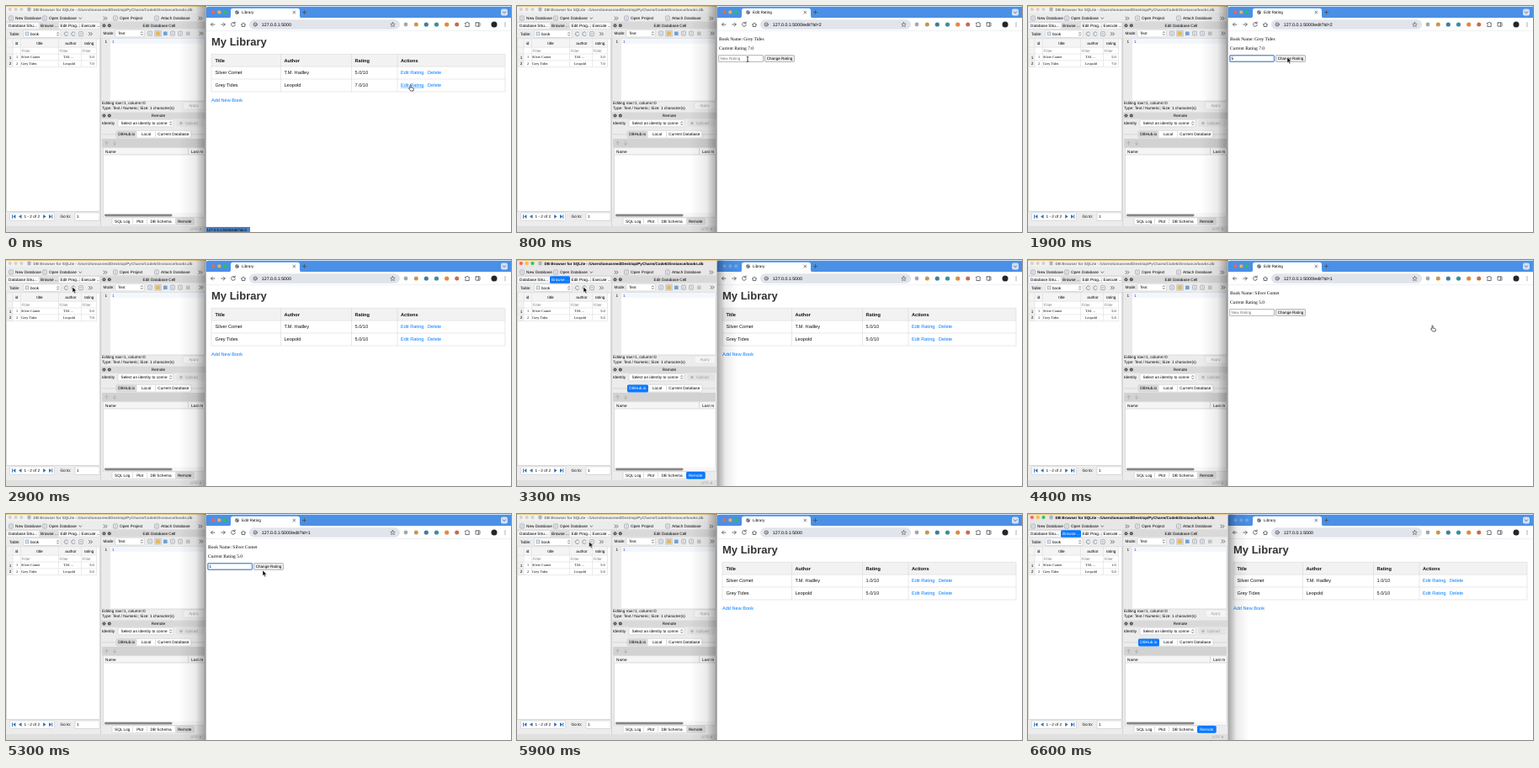
Write an HTML page that moves like this. It is 600 px wide and 269 px high and loops after 6.7 s.

```html
<!DOCTYPE html>
<html lang="en">
<head>
<meta charset="utf-8">
<title>Library ratings</title>
<style>
html, body { margin: 0; width: 100%; height: 100%; overflow: hidden; background: #fff; }
svg { display: block; width: 600px; height: 269px; }
text { font: 4.7px "Liberation Sans", Arial, sans-serif; fill: #000; text-rendering: geometricPrecision; }
.mid { text-anchor: middle; }
.end { text-anchor: end; }
.dim text, text.dim { fill: #a0a0a0; }
.small text { font-size: 4.3px; }
.filter text { fill: #858585; }
.cells text { font: 4.2px "Liberation Serif", Times, serif; }
.title text { font-size: 4.5px; font-weight: bold; text-anchor: middle; }
.title .back { fill: #777; }
.url text { font-size: 5.25px; }
.page text { font-size: 5.6px; fill: #111; }
.page .head text { font-weight: bold; }
.page .h1 { font-size: 13px; font-weight: bold; fill: #333; }
.page .link { fill: #007bff; }
.form text { font: 5.5px "Liberation Serif", Times, serif; fill: #000; }
.form .ctl { font: 4.6px "Liberation Sans", Arial, sans-serif; }
.form .hint { fill: #757575; }
.line { fill: none; stroke: #c6c6c6; stroke-width: .6; }
.box { fill: #fff; stroke: #c9c9c9; stroke-width: .6; }
.ink { fill: none; stroke: #4b4f55; stroke-width: .8; stroke-linecap: round; stroke-linejoin: round; }
.pill { fill: #0a7aff; }
.pill ~ text { fill: #fff; }

/* state changes are hard cuts, only the pointer travels */
.lib, .edit, .front, .back, .hover1, .hover2, .focus, .hint, .typed, .first, .second,
.old-a, .new-a, .old-b, .new-b, .db-old-a, .db-new-a, .db-old-b, .db-new-b,
.arrow, .hand, .beam { animation: 6.7s step-end infinite; }
.lib { animation-name: lib; }
.edit { animation-name: edit; }
.front { animation-name: front; }
.back { animation-name: back; }
.hover1 { animation-name: hover1; }
.hover2 { animation-name: hover2; }
.focus { animation-name: focus; }
.hint { animation-name: hint; }
.typed { animation-name: typed; }
.second { animation-name: until3000; }
.first { animation-name: from3000; }
.old-a { animation-name: until5500; }
.new-a { animation-name: from5500; }
.old-b { animation-name: until2000; }
.new-b { animation-name: from2000; }
.db-old-a { animation-name: until6200; }
.db-new-a { animation-name: from6200; }
.db-old-b { animation-name: until3300; }
.db-new-b { animation-name: from3300; }
.arrow { animation-name: arrow; }
.hand { animation-name: hand; }
.beam { animation-name: beam; }
.pointer { animation: travel 6.7s ease-in-out infinite; }

@keyframes lib { 0% { opacity: 1 } 4.47% { opacity: 0 } 29.85% { opacity: 1 } 65.67% { opacity: 0 } 82.08%, to { opacity: 1 } }
@keyframes edit { 0% { opacity: 0 } 4.47% { opacity: 1 } 29.85% { opacity: 0 } 65.67% { opacity: 1 } 82.08%, to { opacity: 0 } }
@keyframes front { 0% { opacity: 0 } 44.77% { opacity: 1 } 61.19% { opacity: 0 } 89.55%, to { opacity: 1 } }
@keyframes back { 0% { opacity: 1 } 44.77% { opacity: 0 } 61.19% { opacity: 1 } 89.55%, to { opacity: 0 } }
@keyframes hover2 { 0% { opacity: 1 } 4.47%, to { opacity: 0 } }
@keyframes hover1 { 0% { opacity: 0 } 61.19% { opacity: 1 } 65.67%, to { opacity: 0 } }
@keyframes focus { 0% { opacity: 0 } 13.43% { opacity: 1 } 29.85% { opacity: 0 } 74.62%, to { opacity: 1 } }
@keyframes hint { 0% { opacity: 1 } 17.91% { opacity: 0 } 29.85% { opacity: 1 } 76.11%, to { opacity: 0 } }
@keyframes typed { 0% { opacity: 0 } 17.91% { opacity: 1 } 29.85% { opacity: 0 } 76.11%, to { opacity: 1 } }
@keyframes until2000 { 0% { opacity: 1 } 29.85%, to { opacity: 0 } }
@keyframes from2000 { 0% { opacity: 0 } 29.85%, to { opacity: 1 } }
@keyframes until3000 { 0% { opacity: 1 } 44.77%, to { opacity: 0 } }
@keyframes from3000 { 0% { opacity: 0 } 44.77%, to { opacity: 1 } }
@keyframes until3300 { 0% { opacity: 1 } 49.25%, to { opacity: 0 } }
@keyframes from3300 { 0% { opacity: 0 } 49.25%, to { opacity: 1 } }
@keyframes until5500 { 0% { opacity: 1 } 82.08%, to { opacity: 0 } }
@keyframes from5500 { 0% { opacity: 0 } 82.08%, to { opacity: 1 } }
@keyframes until6200 { 0% { opacity: 1 } 92.53%, to { opacity: 0 } }
@keyframes from6200 { 0% { opacity: 0 } 92.53%, to { opacity: 1 } }
@keyframes hand { 0% { opacity: 1 } 5.97% { opacity: 0 } 61.19% { opacity: 1 } 66.41%, to { opacity: 0 } }
@keyframes beam { 0% { opacity: 0 } 10.44% { opacity: 1 } 21% { opacity: 0 } 71.64% { opacity: 1 } 76.86%, to { opacity: 0 } }
@keyframes arrow {
  0% { opacity: 0 } 5.97% { opacity: 1 } 10.44% { opacity: 0 } 21% { opacity: 1 } 61.19% { opacity: 0 }
  66.41% { opacity: 1 } 71.64% { opacity: 0 } 76.86% { opacity: 1 } 94.02%, to { opacity: 0 }
}
@keyframes travel {
  0%, 4.47% { transform: translate(480px, 94px) }
  11.9%, 19.4% { transform: translate(274px, 63px) }
  26.8%, 29.85% { transform: translate(308px, 61px) }
  41.8%, 50.7% { transform: translate(79px, 32px) }
  59%, 65.67% { transform: translate(480px, 78px) }
  73.1%, 76.1% { transform: translate(276px, 63px) }
  79.1% { transform: translate(305px, 67px) }
  80.6%, 82.8% { transform: translate(307px, 63px) }
  88.8%, to { transform: translate(79px, 32px) }
}
</style>
</head>
<body>
<svg viewBox="0 0 600 269">
  <defs>
    <linearGradient id="shade"><stop offset="0" stop-opacity="0"/><stop offset=".6" stop-opacity=".08"/><stop offset="1" stop-opacity=".35"/></linearGradient>
    <path id="updown" d="M1.4 2.8l1.1-1.2 1.1 1.2M1.4 4.3l1.1 1.2 1.1-1.2" fill="none" stroke-width=".7"/>
    <g id="step">
      <use class="back" href="#updown" stroke="#222"/>
      <g class="front"><rect width="5" height="7" rx="1.3" fill="#1f7bf5"/><use href="#updown" stroke="#fff"/></g>
    </g>
    <path id="more" class="ink" d="M0 0l1.6 1.7L0 3.4M2.4 0L4 1.7 2.4 3.4"/>
    <g id="dock">
      <circle r="2" fill="#4b4b4b"/><circle cx="6.3" r="2" fill="#4b4b4b"/>
      <path d="M-.8-.8l1.6 1.6M.8-.8l-1.6 1.6M5.5 0h1.6" stroke="#eee" stroke-width=".5"/>
    </g>
    <g id="lights"><circle r="2"/><circle cx="6.8" r="2"/><circle cx="13.6" r="2"/></g>
    <g id="lit">
      <circle r="2" fill="#ff5f57"/><circle cx="6.8" r="2" fill="#febc2e"/><circle cx="13.6" r="2" fill="#28c840"/>
    </g>
    <g id="doc"><rect x="-2.3" y="-2.5" width="4.6" height="5" rx=".6" fill="#f7f9fb" stroke="#7b8794" stroke-width=".6"/><path d="M-1.2-.7h2.4M-1.2.8h2.4" stroke="#7b8794" stroke-width=".5"/></g>
  </defs>

  <!-- database window -->
  <rect width="238" height="269" fill="#ececec"/>
  <rect width="238" height="8" fill="#f1f1f1"/>
  <rect class="front" width="238" height="19" fill="#e8e6e6"/>
  <rect width="238" height=".8" fill="#e6c272"/>
  <use href="#lights" x="4.8" y="4" fill="#d2d0cc"/>
  <use class="front" href="#lit" x="4.8" y="4"/>
  <g class="title">
    <rect x="25.5" y="1.8" width="4" height="4.4" rx=".8" fill="#a9b4bf"/>
    <text class="back" x="127" y="5.7">DB Browser for SQLite - /Users/tomasreed/Desktop/PyCharm/Code63/instance/books.db</text>
    <text class="front" x="127" y="5.7">DB Browser for SQLite - /Users/tomasreed/Desktop/PyCharm/Code63/instance/books.db</text>
  </g>
  <use href="#doc" x="6" y="14.5"/><text x="11" y="16.4">New Database</text>
  <use href="#doc" x="46" y="14.5"/><text x="51" y="16.4">Open Database</text>
  <path d="M87 14l1.3 1.4 1.3-1.4" class="ink"/>
  <use href="#more" x="116" y="13"/>
  <use href="#doc" x="130" y="14.5"/><text x="135" y="16.4">Open Project</text>
  <use href="#doc" x="179" y="14.5"/><text x="184" y="16.4">Attach Database</text>
  <use href="#more" x="229" y="13"/>
  <path class="line" d="M0 19H238M112.5 19V262"/>

  <!-- browse pane -->
  <rect x=".5" y="19.5" width="111" height="8" rx="1.5" fill="#f8f8f8" stroke="#d2d2d2" stroke-width=".5"/>
  <rect x="39" y="19.5" width="24" height="8" rx="1.5" fill="#dedede"/>
  <path class="line" d="M87.5 20.5v6"/>
  <text x="3" y="25.2">Database Stru...</text>
  <text x="41" y="25.2">Browse ...</text>
  <text x="64.5" y="25.2">Edit Prag...</text>
  <text x="89.5" y="25.2">Execute ...</text>
  <g class="front"><rect class="pill" x="39" y="19.3" width="24" height="8.4" rx="1.5"/><text x="41" y="25.2">Browse ...</text></g>
  <text x="4" y="35">Table:</text>
  <rect class="box" x="20.5" y="28.8" width="44.5" height="8.7" rx="1.6"/>
  <rect x="23" y="31" width="4" height="4" fill="#d7e4f3" stroke="#7b8794" stroke-width=".5"/>
  <text x="29" y="35">book</text>
  <use href="#step" x="59.2" y="29.7"/>
  <path class="ink" d="M73.6 32a2.3 2.3 0 1 0 0 2.4M82 32a2.3 2.3 0 1 0 0 2.4" style="stroke:#7c8a99"/>
  <use href="#doc" x="89" y="33.2"/>
  <use href="#more" x="98.5" y="31.5"/>
  <rect class="box" x=".5" y="39" width="111" height="205.5"/>
  <path d="M1 39.4h106.5V57H1z" fill="#f4f4f4"/>
  <path d="M8 49.2h99.5V57H8z" fill="#fff"/>
  <path d="M1 57h7v15.6H1z" fill="#f0f0f0"/>
  <path class="line" d="M8 39V72.6M17.5 39V72.6M62.5 39V72.6M89.5 39V72.6M107.5 39V72.6M1 49.2H107.5M1 57H107.5M1 64.8H107.5M1 72.6H107.5" style="stroke:#dedede"/>
  <g class="mid">
    <text x="12.5" y="45.8">id</text><text x="40" y="45.8">title</text>
    <text x="77" y="45.8">author</text><text x="98.5" y="45.8">rating</text>
    <text x="5" y="62.5">1</text><text x="5" y="70.2">2</text>
  </g>
  <g class="filter">
    <text x="18.5" y="54.9">Filter</text><text x="63.5" y="54.9">Filter</text><text x="90.5" y="54.9">Filter</text>
  </g>
  <g class="cells">
    <text x="12" y="62.2">1</text><text x="18" y="62.2">Silver Comet</text><text x="68" y="62.2">T.M. ...</text>
    <text x="12" y="70">2</text><text x="18" y="70">Grey Tides</text><text x="68" y="70">Leopold</text>
    <g class="end">
      <text class="db-old-a" x="104.5" y="62.2">5.0</text><text class="db-new-a" x="104.5" y="62.2">1.0</text>
      <text class="db-old-b" x="104.5" y="70">7.0</text><text class="db-new-b" x="104.5" y="70">5.0</text>
    </g>
  </g>
  <rect class="box" x="4.5" y="246" width="53" height="9.3" rx="1"/>
  <path d="M7 248.3h.9v4.6H7zM11.4 248.3v4.6l-3.2-2.3zM18.5 248.3v4.6l-3.4-2.3zM44.2 248.3v4.6l3.4-2.3zM51 248.3v4.6l3.2-2.3zM54.4 248.3h.9v4.6h-.9z" fill="#2f6fb5"/>
  <text x="21.5" y="252.4">1 - 2 of 2</text>
  <text x="64.5" y="252.4">Go to:</text>
  <rect class="box" x="82" y="246" width="29" height="9.3"/>
  <text x="84" y="252.4">1</text>

  <!-- cell editor -->
  <rect x="113" y="19.3" width="124" height="8" fill="#d9d9d9"/>
  <use href="#dock" x="116.5" y="23.3"/>
  <text class="mid" x="182" y="25.1">Edit Database Cell</text>
  <text x="115.5" y="34.3">Mode:</text>
  <rect class="box" x="130" y="28.2" width="34.5" height="8.7" rx="1.6"/>
  <text x="133" y="34.3">Text</text>
  <use href="#step" x="158.8" y="29"/>
  <use href="#doc" x="171" y="32.6"/>
  <rect x="176" y="28.5" width="9" height="8.2" rx="1" fill="#d2d2d2"/>
  <rect x="178.2" y="30.4" width="4.6" height="4.6" rx=".5" fill="#e7b85a"/>
  <rect x="187" y="30.4" width="4.6" height="4.6" rx=".5" fill="#6fa1d8"/>
  <use href="#doc" x="198" y="32.6"/><use href="#doc" x="207" y="32.6"/>
  <rect x="214" y="30.4" width="4.6" height="4.6" rx=".5" fill="#c4c4c4"/>
  <use href="#more" x="230" y="30.9"/>
  <rect class="box" x="114" y="38.3" width="122" height="74.7"/>
  <rect x="114.4" y="38.6" width="9.6" height="74.1" fill="#eaeaea"/>
  <rect x="124" y="38.8" width="111.7" height="6" fill="#f3f7fd"/>
  <text x="117.5" y="43.6">1</text><text x="126" y="43.6" style="fill:#2d4fc9">1</text>
  <text x="114" y="117.2">Editing row=1, column=0</text>
  <text x="114" y="123">Type: Text / Numeric; Size: 1 character(s)</text>
  <rect x="211" y="114.3" width="24.5" height="8.8" rx="1.7" fill="#f5f5f5" stroke="#dcdcdc" stroke-width=".5"/>
  <text class="mid dim" x="223" y="120.4">Apply</text>

  <!-- remote pane -->
  <rect x="113" y="126.6" width="124" height="8" fill="#d9d9d9"/>
  <use href="#dock" x="116.5" y="130.6"/>
  <text class="mid" x="181" y="132.3">Remote</text>
  <text x="114" y="141">Identity</text>
  <rect class="box" x="133" y="135.2" width="66" height="8.6" rx="1.6"/>
  <text x="136.5" y="141">Select an identity to conne</text>
  <use href="#step" x="193.2" y="136"/>
  <rect x="202.5" y="135.2" width="33" height="8.6" rx="1.6" fill="#e3e3e3"/>
  <circle cx="208" cy="139.5" r="1.8" fill="#b9b9b9"/>
  <text class="dim" x="213" y="141">Upload</text>
  <path class="line" d="M114 152.8H236"/>
  <rect class="box" x="131" y="148.3" width="89" height="8.8" rx="1.7"/>
  <rect x="131" y="148.3" width="24.5" height="8.8" rx="1.7" fill="#d9d9d9"/>
  <path class="line" d="M177.5 149.5v6.4"/>
  <g class="mid">
    <text x="143.2" y="154.4">DBHub.io</text><text x="166.5" y="154.4">Local</text><text x="198.8" y="154.4">Current Database</text>
    <g class="front"><rect class="pill" x="131" y="148.4" width="25" height="9" rx="1.7"/><text x="143.4" y="154.4">DBHub.io</text></g>
  </g>
  <rect x="114" y="158" width="122" height="10.3" fill="#d2d2d2"/>
  <path class="ink" d="M118 163l1.6-1.7 1.6 1.7M119.6 161.3v4M127.4 163.6l1.6 1.7 1.6-1.7M129 161.3v4" style="stroke:#aaa"/>
  <rect class="box" x="115.5" y="169" width="120.5" height="82.5"/>
  <rect x="115.8" y="169.3" width="120" height="7.6" fill="#f5f5f5"/>
  <path class="line" d="M116 177H236M216.5 169v8"/>
  <text x="118" y="174.6">Name</text><text x="220" y="174.6">Last m</text>
  <path d="M116 246.5h119.8v4.8H116z" fill="#f7f7f7"/>
  <rect x="117" y="247.8" width="80.5" height="2.6" rx="1.3" fill="#858585"/>
  <rect class="box" x="126" y="252" width="97.5" height="8.6" rx="1.7"/>
  <rect x="201" y="252" width="22.5" height="8.6" rx="1.7" fill="#d9d9d9"/>
  <path class="line" d="M150.5 253.3v6M167.5 253.3v6"/>
  <g class="mid">
    <text x="138.2" y="258">SQL Log</text><text x="159.2" y="258">Plot</text>
    <text x="184" y="258">DB Schema</text><text x="212.2" y="258">Remote</text>
    <g class="front"><rect class="pill" x="201" y="251.9" width="22.7" height="8.8" rx="1.7"/><text x="212.2" y="258">Remote</text></g>
  </g>
  <path d="M0 262h238v7H0z" fill="#e0e0e0"/>
  <text class="dim" x="219" y="267">UTF-8</text>
  <rect class="back" x="206" width="32" height="269" fill="url(#shade)"/>

  <!-- browser window -->
  <path d="M237.5 269V4q0-3.3 3.3-3.3H600V269z" fill="#fff"/>
  <path d="M237.5 14V4q0-3.3 3.3-3.3H600V14z" fill="#4a90e6"/>
  <use class="back" href="#lit" x="246.5" y="7.3"/>
  <use class="front" href="#lights" x="246.5" y="7.3" fill="#79abea"/>
  <path d="M264.5 14.2q2.5 0 2.5-2.5V5.4q0-2.6 2.6-2.6h76.8q2.6 0 2.6 2.6v6.3q0 2.5 2.5 2.5z" fill="#fff"/>
  <circle cx="274.5" cy="7.6" r="2.4" fill="#5f6368"/>
  <path d="M272.6 7.2q2 .4 1.6 2.2M274.6 5.4q0 1.6 2 1.6" fill="none" stroke="#fff" stroke-width=".6"/>
  <text class="lib" x="280" y="9.2">Library</text><text class="edit" x="280" y="9.2">Edit Rating</text>
  <rect x="588" y="3.6" width="8" height="8" rx="2" fill="#cfe0fa"/>
  <path class="ink" d="M341 6.2l2.6 2.6M343.6 6.2l-2.6 2.6M354.5 5.4v4.2M352.4 7.5h4.2M590.4 6.9l1.6 1.6 1.6-1.6"/>
  <path class="line" d="M238 29.6H600" style="stroke:#e1e4e9"/>
  <path class="ink" d="M248 22h-4.4m1.9-2l-2 2 2 2M255.8 22h4.4m-1.9-2l2 2-2 2M271.8 20.4a2.4 2.4 0 1 0 .5 2M272.1 18.9v1.8h-1.8M279.4 22.2l2.6-2.3 2.6 2.3M280.2 21.8v2.7h3.6v-2.7"/>
  <rect x="289" y="16.3" width="179" height="11.4" rx="5.7" fill="#e1e4ea"/>
  <circle class="ink" cx="296.2" cy="22" r="2.1"/><path class="ink" d="M296.2 21.8v1"/>
  <g class="url">
    <text class="lib" x="303.8" y="23.9">127.0.0.1:5000</text>
    <g class="edit">
      <text class="second" x="303.8" y="23.9">127.0.0.1:5000/edit?id=2</text>
      <text class="first" x="303.8" y="23.9">127.0.0.1:5000/edit?id=1</text>
    </g>
  </g>
  <path class="ink" d="M459.5 19.4l.8 1.8 1.9.2-1.4 1.3.4 1.9-1.7-1-1.7 1 .4-1.9-1.4-1.3 1.9-.2z" style="stroke-width:.6"/>
  <circle cx="475" cy="22" r="2.4" fill="#a3a8ae"/>
  <circle cx="487.3" cy="22" r="2.5" fill="#c9964f"/>
  <circle cx="499.3" cy="22" r="2.6" fill="#3a7f9e"/>
  <circle cx="511.5" cy="22" r="2.6" fill="#3a8fa0"/>
  <circle cx="523.7" cy="22" r="2.6" fill="#e08a3c"/>
  <circle cx="535.7" cy="22" r="2.5" fill="#c96a4a"/>
  <path class="ink" d="M545.8 20.2h1.4a.9.9 0 0 1 1.8 0h1.2v4.3h-4.4v-1.4a.9.9 0 0 0 0-1.6z"/>
  <rect class="ink" x="558" y="19.8" width="5" height="4.4" rx=".6"/><path class="ink" d="M561.3 20v4"/>
  <circle cx="580" cy="22" r="3.5" fill="#23262b"/>
  <g fill="#4b4f55"><circle cx="593" cy="20" r=".6"/><circle cx="593" cy="22" r=".6"/><circle cx="593" cy="24" r=".6"/></g>

  <!-- library page -->
  <g class="lib page">
    <text class="h1" x="244" y="47.4">My Library</text>
    <rect x="244" y="57.3" width="349" height="14.8" fill="#f2f2f2"/>
    <path class="line" d="M244 57.3H593V102H244zM244 72.1H593M244 87H593M326.5 57.3V102M410.5 57.3V102M465 57.3V102" style="stroke:#d9d9d9"/>
    <g class="head">
      <text x="248.5" y="66.7">Title</text><text x="330.5" y="66.7">Author</text>
      <text x="414.5" y="66.7">Rating</text><text x="469" y="66.7">Actions</text>
    </g>
    <text x="248.5" y="81.3">Silver Comet</text><text x="330.5" y="81.3">T.M. Hadley</text>
    <text class="old-a" x="414.5" y="81.3">5.0/10</text><text class="new-a" x="414.5" y="81.3">1.0/10</text>
    <text class="link" x="469" y="81.3">Edit Rating</text><text class="link" x="501" y="81.3">Delete</text>
    <text x="248.5" y="96.2">Grey Tides</text><text x="330.5" y="96.2">Leopold</text>
    <text class="old-b" x="414.5" y="96.2">7.0/10</text><text class="new-b" x="414.5" y="96.2">5.0/10</text>
    <text class="link" x="469" y="96.2">Edit Rating</text><text class="link" x="501" y="96.2">Delete</text>
    <text class="link" x="244" y="113.5">Add New Book</text>
    <path class="hover1" d="M469 82.2h27.3" stroke="#007bff" stroke-width=".5"/>
    <path class="hover2" d="M469 97.1h27.3" stroke="#007bff" stroke-width=".5"/>
  </g>

  <!-- rating form -->
  <g class="edit form">
    <g class="second"><text x="240" y="40.8">Book Name: Grey Tides</text><text x="240" y="52.2">Current Rating 7.0</text></g>
    <g class="first"><text x="240" y="40.8">Book Name: Silver Comet</text><text x="240" y="52.2">Current Rating 5.0</text></g>
    <rect x="239.8" y="58.8" width="52.7" height="7.4" fill="#fff" stroke="#808080" stroke-width=".6"/>
    <rect class="focus" x="240" y="58.9" width="52.4" height="7.2" rx=".6" fill="#fff" stroke="#2f6fd0" stroke-width=".9"/>
    <text class="ctl hint" x="241.5" y="64.2">New Rating</text>
    <g class="typed"><text class="ctl second" x="241.5" y="64.2">5</text><text class="ctl first" x="241.5" y="64.2">1</text></g>
    <rect x="294.3" y="58.7" width="35.4" height="7.6" rx=".9" fill="#efefef" stroke="#808080" stroke-width=".6"/>
    <text class="ctl mid" x="312" y="64.2">Change Rating</text>
  </g>

  <!-- link preview -->
  <g class="small">
    <g class="hover2"><rect x="237" y="263" width="53" height="6" fill="#4a82c8"/><text x="238.5" y="267.5">127.0.0.1:5000/edit?id=2</text></g>
    <g class="hover1"><rect x="237" y="263" width="53" height="6" fill="#4a82c8"/><text x="238.5" y="267.5">127.0.0.1:5000/edit?id=1</text></g>
  </g>

  <!-- the front window casts its shadow on the other -->
  <rect class="front" x="-262" width="24" height="269" transform="scale(-1 1)" fill="url(#shade)"/>
  <path d="M237.4 1V269" stroke="#a9adb3" stroke-width=".7"/>

  <g class="pointer">
    <path class="arrow" d="M0 0v6.6l1.5-1.3 1.1 2.4 1.2-.5-1.1-2.4h2z" fill="#000" stroke="#fff" stroke-width=".5"/>
    <path class="hand" d="M0 .2q.8-.6 1.2.2V3l2.4.6q.9.3.8 1.2L4 7H.8L-1.4 4.3q0-.9 1-.5L0 4.2z" fill="#fff" stroke="#000" stroke-width=".6"/>
    <path class="beam" d="M-1.2-2.6q1.2 0 1.2.8V2.6q0 .8 1.2.8M1.2-2.6Q0-2.6 0-1.8M0 2.6q0 .8-1.2.8" fill="none" stroke="#000" stroke-width=".7"/>
  </g>
</svg>
</body>
</html>
```
